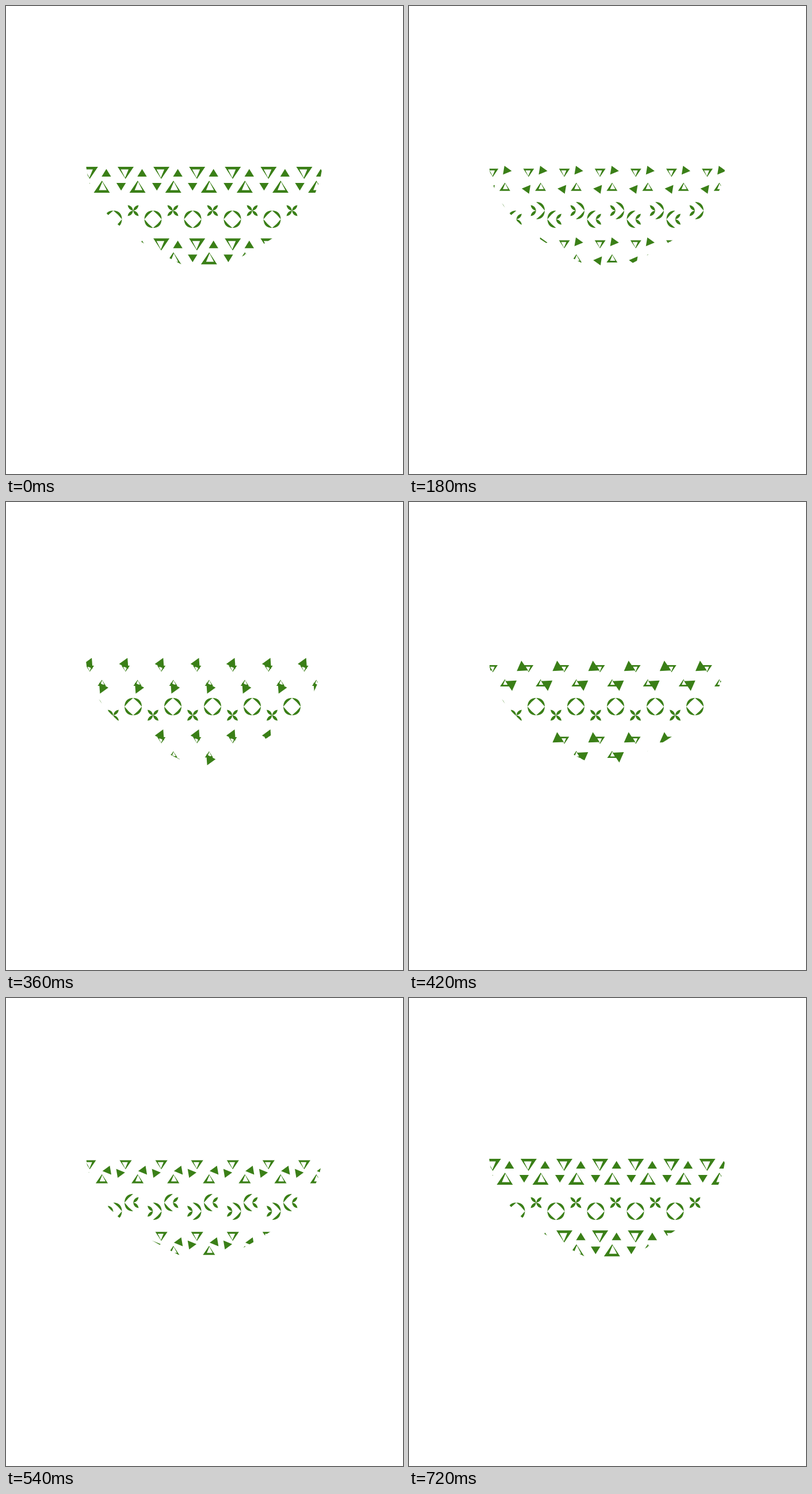
Animation, 690 px wide and 812 px high, one loop 0.75 s. Source, as an HTML page with a canvas:

```html
<!DOCTYPE html>
<html lang="en">
<head>
<meta charset="utf-8">
<title>Patterned bowl</title>
<style>
html, body { margin: 0; width: 690px; height: 812px; overflow: hidden; background: #fff; }
canvas { display: block; }
</style>
</head>
<body>
<canvas id="stage" width="690" height="812"></canvas>
<script>
const ctx = document.getElementById('stage').getContext('2d');
const LOOP = 750, STEP = 30, LAST = 24;
const GREEN = '#3a7f17';

const clamp = v => Math.min(1, Math.max(0, v));
const mix = (a, b, u) => a + (b - a) * u;
const ease = p => p < .5 ? 2 * p * p : 1 - 2 * (1 - p) ** 2;
const span = (p, a, b) => ease(clamp((p - a) / (b - a)));

const triangle = (ax, ay, bx, by, cx, cy) => `M${ax} ${ay}L${bx} ${by}L${cx} ${cy}Z`;
const solid = new Path2D(triangle(0, -8.9, 8.2, 4.3, -8.2, 4.3));
const frame = new Path2D(
  triangle(-14, -10, 14, -10, -.3, 11) + triangle(-8.5, -5.5, 5, -5.5, -1, 9));

const bowl = new Path2D();
bowl.moveTo(138.5, 270);
bowl.bezierCurveTo(144.5, 360, 209.5, 402, 344.5, 468);
bowl.bezierCurveTo(479.5, 402, 544.5, 360, 550.5, 270);

// Two framed triangles, with two solid ones swapping sides around them
function triangles(x, y, p) {
  const turn = ease(p) * Math.PI;
  const swell = Math.exp(-(((p - .57) / .1) ** 2));
  const reach = 1 + .27 * swell;
  const size = p < .43 ? mix(1, .44, p / .43) : mix(.44, 1, (p - .43) / .57);
  for (const half of [0, Math.PI]) {
    ctx.save();
    ctx.translate(x, y);
    ctx.rotate(half);
    ctx.save();
    ctx.translate(-10.3, -12.5);
    ctx.scale(size, size);
    ctx.fill(frame, 'evenodd');
    ctx.restore();
    ctx.rotate(-turn);
    ctx.scale(reach, reach);
    ctx.translate(18.2, -9.8);
    ctx.rotate(-.12 * swell);
    ctx.fill(solid);
    ctx.restore();
  }
}

// One quarter of a flower: u = 0 is a petal, u = 1 an arc of the ring
function leaf(sx, sy, u, sideways) {
  const near = 15 * u, far = mix(9.5, 15, u), drop = mix(9.5, 0, u);
  const [a, b] = sideways ? [[drop, far], [near, 0]] : [[0, near], [far, drop]];
  const dx = b[0] - a[0], dy = b[1] - a[1], len = Math.hypot(dx, dy);
  const mx = (a[0] + b[0]) / 2, my = (a[1] + b[1]) / 2;
  const curve = (bulge, to) => ctx.quadraticCurveTo(
    sx * (mx - dy / len * bulge), sy * (my + dx / len * bulge), sx * to[0], sy * to[1]);
  ctx.beginPath();
  ctx.moveTo(sx * a[0], sy * a[1]);
  curve(mix(5, 10, u), b);
  curve(mix(-5, 1.5, u), a);
  ctx.fill();
}

// Opens in the first half of the loop and closes in the second, right side first
function flower(x, y, p, ring) {
  const opening = p < .5;
  const q = opening ? p : p - .5;
  ctx.save();
  ctx.translate(x, y);
  for (const sx of [-1, 1]) {
    const s = sx > 0 ? span(q, .1, .25) : span(q, .35, .5);
    const u = opening === ring ? 1 - s : s;
    for (const sy of [-1, 1]) leaf(sx, sy, u, opening);
  }
  ctx.restore();
}

function draw() {
  const p = Math.floor(performance.now() % LOOP / STEP) / LAST;
  ctx.fillStyle = '#fff';
  ctx.fillRect(0, 0, 690, 812);
  ctx.save();
  ctx.clip(bowl);
  ctx.fillStyle = GREEN;
  for (let i = 0; i < 8; i++) {
    const x = 156.2 + 62.1 * i;
    triangles(x, 301.5, p);
    triangles(x, 425.7, p);
  }
  for (let i = 0; i < 6; i++) {
    flower(152 + 69 * i, 355, p, false);
    flower(186.5 + 69 * i, 370, p, true);
  }
  ctx.restore();
  requestAnimationFrame(draw);
}
draw();
</script>
</body>
</html>
```
